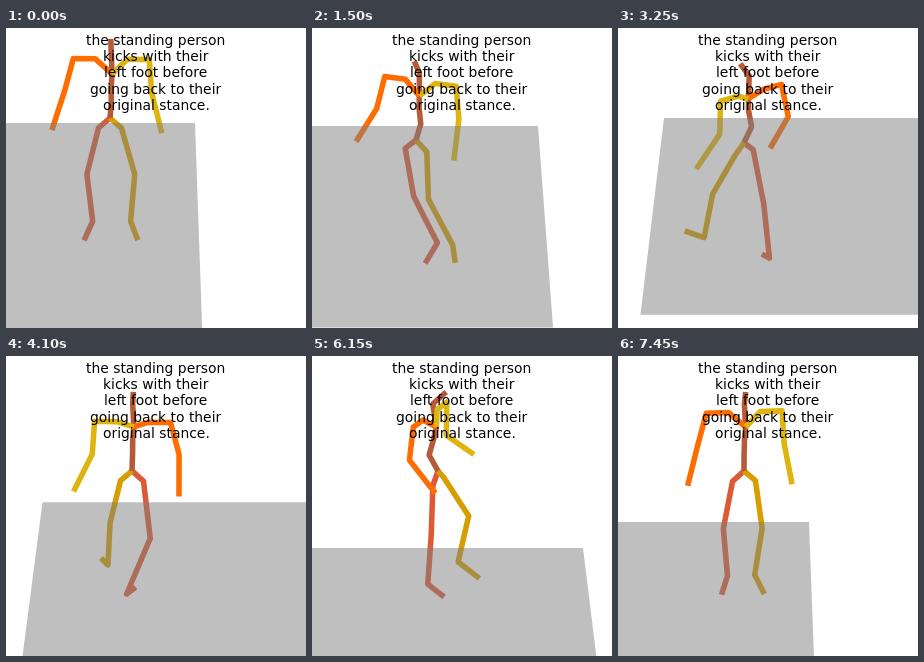
Animation of 300 by 300 pixels, one loop 7500 ms. Source, as an HTML page with a canvas:

```html
<!DOCTYPE html>
<html lang="en">
<head>
<meta charset="utf-8">
<title>Stick figure kick</title>
<style>
  html, body { margin: 0; width: 100%; height: 100%; overflow: hidden; background: #fff; }
  canvas { display: block; width: 100vw; height: 100vh; }
</style>
</head>
<body>
<canvas id="stage" width="300" height="300"></canvas>
<script>
const ctx = document.getElementById('stage').getContext('2d');
const LOOP = 7500, STEP = 50;
const CAPTION = [
  'the standing person', 'kicks with their', 'left foot before',
  'going back to their', 'original stance.'
];

// Key times, the body's turn in radians (0 faces the viewer), limb angles
// in degrees from straight down, and the floor's far right corner.
const times = [0, 1500, 2400, 3250, 4950, 6150, 7450];
const turn = [0.03, 0.35, 1.45, 2.5, 3.85, 5.17, 6.2];
const floorX = [189, 226, 318, 401, 369, 271, 191];
const floorY = [95, 98, 71, 90, 190, 192, 166];
const right = {
  side: -1, legColor: '#dd5a37', armColor: '#ff6d00',
  thigh: [-14, 10, -35, 11, 1, -2, -11],
  shin: [7, 27, -27, 6, -52, -4, 5],
  forearm: [-18, -32, -25, -30, 33, 38, -14],
  upperArm: (c, s) => -15 * c,
  stretch: reach => 1 + reach
};
const left = {
  side: 1, legColor: '#d69e00', armColor: '#ddb50e',
  thigh: [16, 2, 28, -30, 11, 33, 8],
  shin: [-5, 28, 20, -11, 5, -13, -9],
  forearm: [14, -7, -32, -34, -10, 55, 11],
  upperArm: (c, s) => 4 * c + 3 * s,
  stretch: reach => 1 - reach / 2
};

// Monotone cubic through the keys, at rest at both ends.
function track(keys, t) {
  const last = times.length - 1;
  let i = 0;
  while (i < last - 1 && t >= times[i + 1]) i++;
  const slope = j => (keys[j + 1] - keys[j]) / (times[j + 1] - times[j]);
  const tangent = j => {
    if (j === 0 || j === last) return 0;
    const a = slope(j - 1), b = slope(j);
    return a * b <= 0 ? 0 : 2 * a * b / (a + b);
  };
  const dt = times[i + 1] - times[i];
  const k = Math.min(1, (t - times[i]) / dt), q = 1 - k;
  return keys[i] * q * q * (1 + 2 * k) + keys[i + 1] * k * k * (3 - 2 * k)
    + dt * k * q * (tangent(i) * q - tangent(i + 1) * k);
}

function smooth(from, to, t) {
  const k = Math.min(1, Math.max(0, (t - from) / (to - from)));
  return k * k * (3 - 2 * k);
}

const rad = deg => deg * Math.PI / 180;
const settle = t => Math.exp(-t / 700);
const shift = ([x, y], dx, dy) => [x + dx, y + dy];
const bone = (p, length, deg) =>
  shift(p, length * Math.sin(rad(deg)), length * Math.cos(rad(deg)));

function tracePath(points) {
  ctx.beginPath();
  points.forEach(([x, y], i) => i ? ctx.lineTo(x, y) : ctx.moveTo(x, y));
}

function drawLimb(points, color) {
  tracePath(points);
  ctx.strokeStyle = color;
  ctx.stroke();
}

function drawLeg(body, pelvis, c, s, t) {
  const { side } = body;
  const scale = body.stretch(0.2 * Math.exp(-(((t - 4100) / 1600) ** 2)));
  const thigh = track(body.thigh, t), shin = track(body.shin, t);
  const hip = shift(pelvis, side * 11.5 * c, 10 + side * 5 * s);
  const knee = bone(hip, 48 * scale, thigh);
  const ankle = bone(knee, (47 + 22 * Math.sin(rad(shin)) ** 2) * scale, shin);
  // The foot points where the body faces and tips with the shin in profile.
  const fx = -23 * s + side * 8 * c, fy = 6 + 13 * c;
  const tip = rad(shin) * Math.abs(s);
  const toe = shift(ankle,
    fx * Math.cos(tip) + fy * Math.sin(tip),
    fy * Math.cos(tip) - fx * Math.sin(tip));
  drawLimb([pelvis, hip, knee, ankle, toe], body.legColor);
}

function drawArm(body, pelvis, chest, c, s, t) {
  const { side } = body;
  const middle = shift(pelvis, 1 + 10 * s, -54 - 5 * c);
  const along = k => shift(middle, side * k * 38 * c, side * k * 14 * s);
  const shoulder = along(1);
  const elbow = bone(shoulder, 33, body.upperArm(c, s));
  const away = Math.max(0, -side * s);
  const wrist = bone(elbow, 42 * (1 - 0.22 * away), track(body.forearm, t));
  drawLimb([chest, along(0.42), shoulder, elbow, wrist], body.armColor);
}

function drawBody(t) {
  const c = Math.cos(track(turn, t)), s = Math.sin(track(turn, t));
  const pelvis = [104 + 22 * smooth(1500, 2400, t), 115 - 25 * settle(t)];
  const chest = shift(pelvis, 2 + 4 * s, -44);
  ctx.lineWidth = 5.55;
  ctx.lineJoin = 'round';
  ctx.lineCap = 'butt';
  drawLeg(right, pelvis, c, s, t);
  drawLeg(left, pelvis, c, s, t);
  drawLimb([
    pelvis,
    shift(pelvis, 1 + 11 * s, -16),
    shift(pelvis, 1 + 6 * s, -32),
    chest,
    shift(pelvis, 1 + 7 * s, -67),
    shift(pelvis, 1 - 8 * s, -79)
  ], '#b75a39');
  drawArm(right, pelvis, chest, c, s, t);
  drawArm(left, pelvis, chest, c, s, t);
}

// The translucent floor lies over the figure.
function drawFloor(t) {
  const x1 = track(floorX, t), x0 = x1 - 355;
  const far = track(floorY, t);
  const depth = 153.5 + 0.48 * far + 8 * settle(t);
  const nearX = x => x + (x - 156.8) * 0.00108 * depth;
  tracePath([[x0, far], [x1, far], [nearX(x1), far + depth], [nearX(x0), far + depth]]);
  ctx.fillStyle = 'rgba(128, 128, 128, 0.5)';
  ctx.fill();
}

function drawCaption() {
  ctx.fillStyle = '#000';
  ctx.font = '13.89px "DejaVu Sans", sans-serif';
  CAPTION.forEach((line, i) => {
    const x = Math.round(150 - ctx.measureText(line).width / 2);
    ctx.fillText(line, x, Math.round(17 + i * 16.2));
  });
}

function draw(now) {
  const t = Math.floor((now % LOOP) / STEP) * STEP;
  ctx.fillStyle = '#fff';
  ctx.fillRect(0, 0, 300, 300);
  drawBody(t);
  drawFloor(t);
  drawCaption();
}

let start = null;
function tick(now) {
  if (start === null) start = now;
  draw(Math.max(0, now - start));
  requestAnimationFrame(tick);
}
draw(0);
requestAnimationFrame(tick);
</script>
</body>
</html>
```
